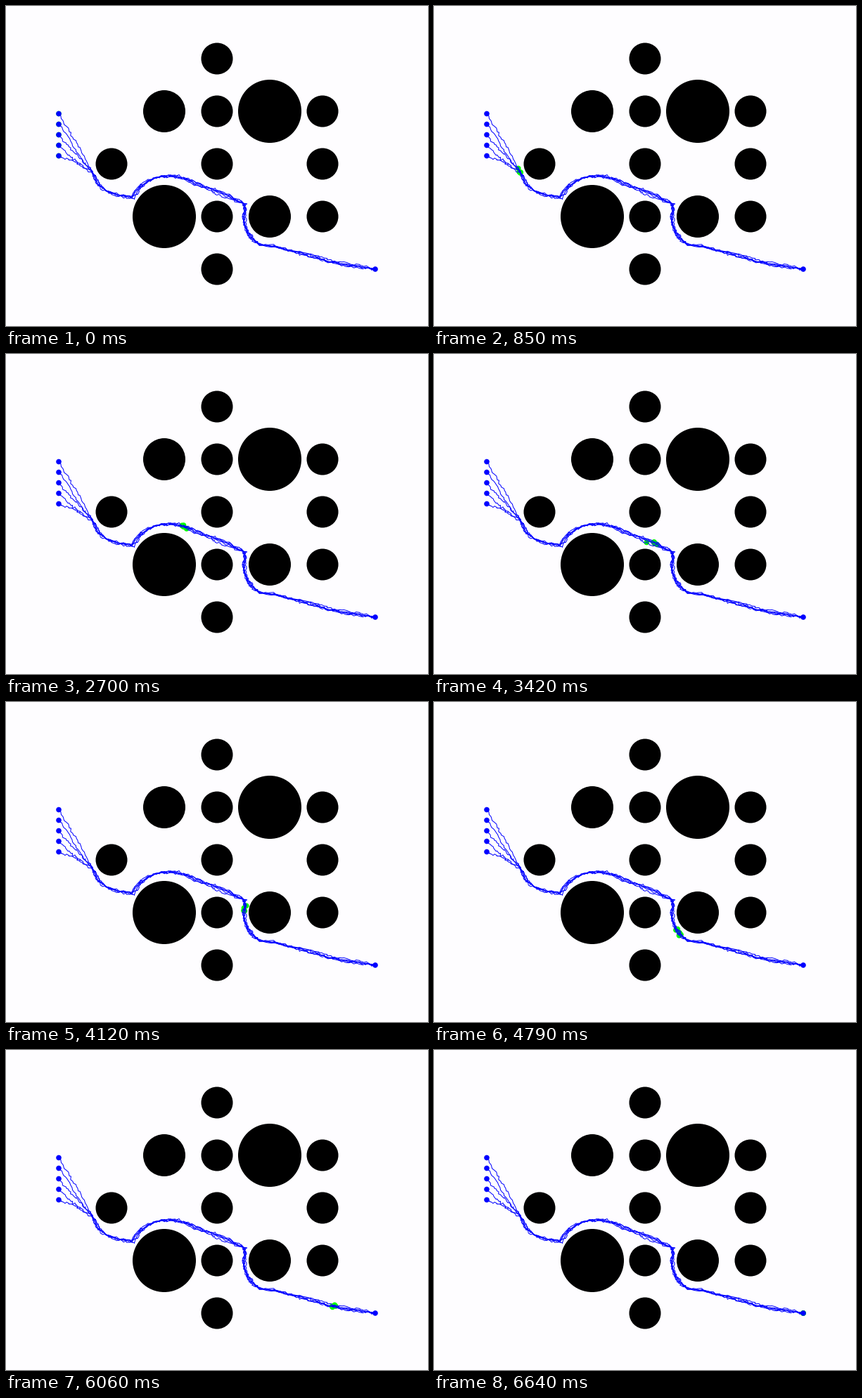
Animation, 600 px wide and 456 px high, one loop 7000 ms. Source, as a matplotlib script:

```python
import numpy as np
import matplotlib.pyplot as plt
from matplotlib.animation import FuncAnimation
from matplotlib.collections import LineCollection
from matplotlib.patches import Circle

W, H, DPI = 600, 456, 96
PX = 72 / DPI
TICK, LOOP, FPS = 10, 7000, 33
STEPS = 219
BLUE, GREEN = "#0000ff", "#00ff00"

CELL = 75
SMALL, MEDIUM, LARGE = 22.5, 30, 45
# Obstacles by grid cell
OBSTACLES = {
    SMALL: [(4, 1), (4, 2), (6, 2), (2, 3), (4, 3), (6, 3), (4, 4), (6, 4),
            (4, 5)],
    MEDIUM: [(3, 2), (5, 4)],
    LARGE: [(5, 2), (3, 4)],
}
GOAL = (525, 375)
STARTS = [(75, 153.5 + 15 * i) for i in range(5)]


def arc(col, row, radii, angles, steps, n=12):
    """Swing around an obstacle while drifting outwards, as (x, y, step)."""
    f = np.linspace(0, 1, n)
    a = np.radians(angles[0] + (angles[1] - angles[0]) * f)
    r = radii[0] + (radii[1] - radii[0]) * f ** 1.5
    return np.column_stack([CELL * col + r * np.cos(a),
                            CELL * row + r * np.sin(a),
                            np.linspace(*steps, n)])


ROUTE = np.vstack([
    arc(2, 3, (29.5, 46), (156, 77), (29, 50)),
    arc(3, 4, (53, 63), (210, 309), (57, 94)),
    (338, 281, 123),
    arc(5, 4, (36, 43), (196, 109), (133, 168)),
    (380, 342, 172),
    (470, 366, 201),
    (*GOAL, STEPS - 1),
])

rng = np.random.default_rng(12)
k = np.arange(STEPS + 1)
taper = np.clip(np.minimum(k, STEPS - k) / 8, 0, 1)


def drift(size):
    """Smooth random wander along the steps."""
    waves = [np.sin(k / p + rng.uniform(0, 2 * np.pi)) for p in (5, 9, 17)]
    return size * taper * sum(waves) / 2


def make_path(start):
    x, y, step = np.vstack([(*start, 0), ROUTE]).T
    t = k + drift(2.3)
    jitter = rng.normal(0, 0.85, (2, k.size)) * np.clip(taper * 4, 0, 1)
    return np.column_stack([np.interp(t, step, x) + drift(1.8) + jitter[0],
                            np.interp(t, step, y) + drift(1.8) + jitter[1]])


paths = [make_path(s) for s in STARTS]
# The first path swings above the rest past the middle
paths[0] -= np.outer(np.exp(-((k - 109) / 6) ** 2), (3, 6))

fig = plt.figure(figsize=(W / DPI, H / DPI), dpi=DPI, facecolor="#fefdff")
ax = fig.add_axes([0, 0, 1, 1])
ax.set(xlim=(0, W), ylim=(H, 0))
ax.axis("off")


def disc(center, r, color, z):
    return ax.add_patch(Circle(center, r, fc=color, ec="none", zorder=z))


for radius, cells in OBSTACLES.items():
    for col, row in cells:
        disc((CELL * col, CELL * row), radius, "black", 1)

balls = [disc(p[0], 3.8, GREEN, 2) for p in paths]
ax.add_collection(LineCollection(paths, colors=BLUE, linewidths=PX, zorder=3),
                  autolim=False)
for c in STARTS + [GOAL]:
    disc(c, 3.8, BLUE, 4)


def update(tick):
    step = min(int((tick + 0.5) * FPS * TICK / 1000), STEPS)
    for ball, path in zip(balls, paths):
        ball.set_center(path[step])
    return balls


anim = FuncAnimation(fig, update, frames=LOOP // TICK, interval=TICK,
                     repeat=True, repeat_delay=0, blit=True)
plt.show()
```
